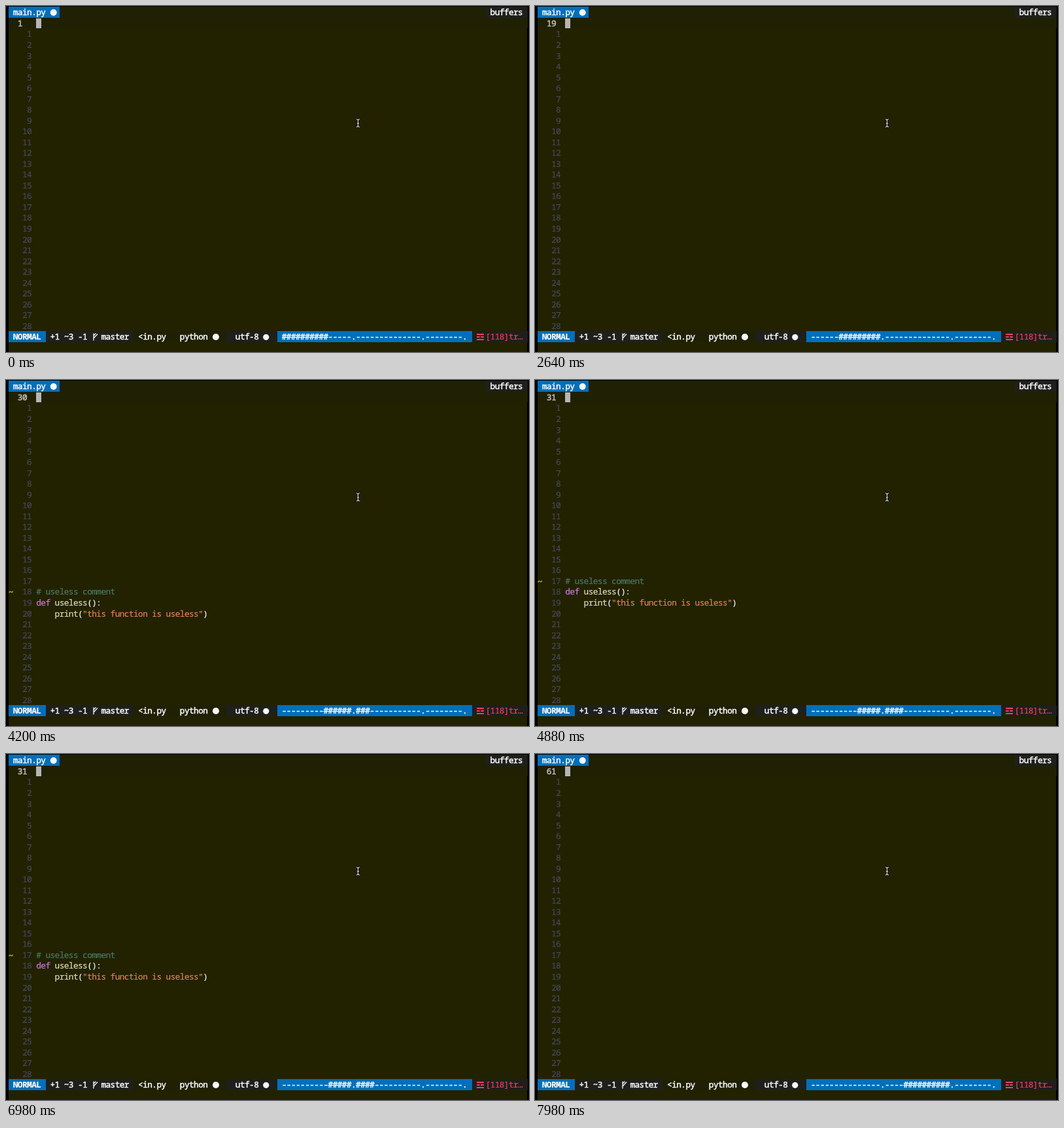
Recreate the animation shown at these times as an HTML page with a canvas. Size 800 by 529 pixels, loop 8 s.

```html
<!DOCTYPE html>
<html lang="en">
<head>
<meta charset="utf-8">
<title>Smooth scroll</title>
<style>
html, body { margin: 0; width: 100%; height: 100%; overflow: hidden; background: #000; }
canvas { display: block; width: 800px; height: 529px; }
</style>
</head>
<body>
<canvas id="stage" width="800" height="529"></canvas>
<script>
const ctx = document.getElementById('stage').getContext('2d');

const LOOP = 8000;
const LEFT = 4, TOP = 1.4, CELL = 7.085, PITCH = 16.53;
const ROWS = 28, STATUS = 30, COLS = 112;
const FONT = '"Noto Sans Mono", "DejaVu Sans Mono", monospace';
const THIN = 0.2, MEDIUM = 0.5;

const C = {
  bg: '#222200', line: '#202004', panel: '#1f1f1c', blue: '#006fba', white: '#fafafa',
  num: '#48485a', current: '#c4c4c0', cursor: '#b6b6b6',
  comment: '#4b7a66', keyword: '#d47ce4', name: '#e0e0bc',
  string: '#e08458', sign: '#bcb000', warn: '#f04058'
};

// Buffer lines that hold code, as [text, colour] runs
const CODE = {
  48: [['# useless comment', C.comment]],
  49: [['def', C.keyword], [' useless', C.name], ['():', C.white]],
  50: [['    print', C.name], ['(', C.white], ['"this function is useless"', C.string], [')', C.white]]
};

const colX = col => LEFT + col * CELL;
const rowY = row => TOP + row * PITCH;

function fill(color, x, y, w, h) {
  ctx.fillStyle = color;
  ctx.fillRect(x, y, w, h);
}

function band(color, row, from, to) {
  const x = Math.round(colX(from)), y = Math.round(rowY(row));
  fill(color, x, y, Math.round(colX(to)) - x, Math.round(rowY(row + 1)) - y);
}

// Each glyph sits in the middle of its terminal cell; a fine outline sets the weight
function put(text, col, row, color, outline = THIN, weight = 400) {
  ctx.font = `${weight} 12.8px ${FONT}`;
  ctx.textAlign = 'center';
  ctx.textBaseline = 'alphabetic';
  ctx.fillStyle = ctx.strokeStyle = color;
  ctx.lineWidth = outline;
  ctx.lineJoin = 'round';
  const y = Math.round(rowY(row) + 13);
  [...text].forEach((ch, i) => {
    const x = colX(col + i + 0.5);
    ctx.fillText(ch, x, y);
    ctx.strokeText(ch, x, y);
  });
}

const label = (text, col, row) => put(text, col, row, C.white, MEDIUM);

function dot(x, y, r) {
  ctx.fillStyle = C.white;
  ctx.beginPath();
  ctx.arc(x, y, r, 0, Math.PI * 2);
  ctx.fill();
}

function stroke(path, color, width) {
  ctx.strokeStyle = color;
  ctx.lineWidth = width;
  ctx.stroke(new Path2D(path));
}

// Ticks come in threes: one of 100 ms, then two of 20 ms
function tickAt(t) {
  const rest = t % 140;
  return 3 * Math.floor(t / 140) + (rest < 100 ? 0 : rest < 120 ? 1 : 2);
}

// A slow page of single lines, a pause, then a quick page
function lineAt(tick) {
  const slow = Math.min(31, Math.max(1, Math.floor((tick + 1) / 3)));
  const quick = Math.min(30, Math.max(0, 3 * Math.floor((tick - 150) / 2)));
  return slow + quick;
}

function drawTabs() {
  band(C.line, 0, 0, COLS);
  band(C.panel, 0, 103, COLS);
  band(C.blue, 0, 0, 11);
  label('main.py', 1, 0);
  dot(72.7, 10, 5);
  label('buffers', 104, 0);
}

function drawCode(line, row) {
  let col = 6;
  for (const [text, color] of CODE[line] || []) {
    put(text, col, row, color);
    col += text.length;
  }
}

function drawBuffer(line) {
  band(C.line, 1, 0, COLS);
  for (let i = 0; i <= ROWS; i++) {
    const row = i + 1;
    if (i) put(String(i).padStart(3), 2, row, C.num);
    if (line + i === 48) put('~', 0, row, C.sign, MEDIUM, 700);
    drawCode(line + i, row);
  }
  put(String(line), 2, 1, C.current, MEDIUM);
  fill(C.cursor, 46, 19, 8, 15);
  const under = CODE[line];
  if (under) put(under[0][0][0], 6, 1, C.bg);
}

function scrollBar(line) {
  const start = Math.floor((line - 1) / 3);
  let bar = '';
  for (let i = 0; i < 40; i++) {
    const marked = i === 15 || i === 30 || i === 39;
    bar += marked ? '.' : i >= start && i < start + 10 ? '#' : '-';
  }
  return bar;
}

function drawStatus(line) {
  band(C.line, STATUS, 0, COLS);
  band(C.panel, STATUS, 8, 27);
  band(C.panel, STATUS, 47, 58);
  band(C.panel, STATUS, 100, COLS);
  band(C.blue, STATUS, 0, 8);
  band(C.blue, STATUS, 58, 100);
  put('NORMAL', 1, STATUS, C.white, THIN, 700);
  label('+1 ~3 -1', 9, STATUS);
  stroke('M134 500.5V511.5M134 508L140 501.5M134 504L137.5 500.5', C.white, 1.3);
  label('master', 20, STATUS);
  label('<in.py', 28, STATUS);
  label('python', 37, STATUS);
  dot(321, 506, 5);
  label('utf-8', 49, STATUS);
  dot(397.8, 506.3, 4.6);
  label(scrollBar(line), 59, STATUS);
  stroke('M720 502H731M720 506H724.8M726.2 506H731M720 510H731', C.warn, 1.8);
  put('[118]tr…', 103, STATUS, C.warn, THIN);
}

function drawPointer() {
  const beam = 'M536 173Q538.5 173 538.5 175.5V182.5Q538.5 185 536 185'
    + 'M541 173Q538.5 173 538.5 175.5M538.5 182.5Q538.5 185 541 185M537 179.5H540';
  stroke(beam, '#000', 3);
  stroke(beam, '#dcdcdc', 1.2);
}

function draw(t) {
  const line = lineAt(tickAt(t));
  fill('#000', 0, 0, 800, 529);
  fill(C.bg, LEFT, 2, 793, 527);
  drawTabs();
  drawBuffer(line);
  drawStatus(line);
  drawPointer();
}

const begin = performance.now();
function frame() {
  draw((performance.now() - begin) % LOOP);
  requestAnimationFrame(frame);
}
frame();
</script>
</body>
</html>
```
